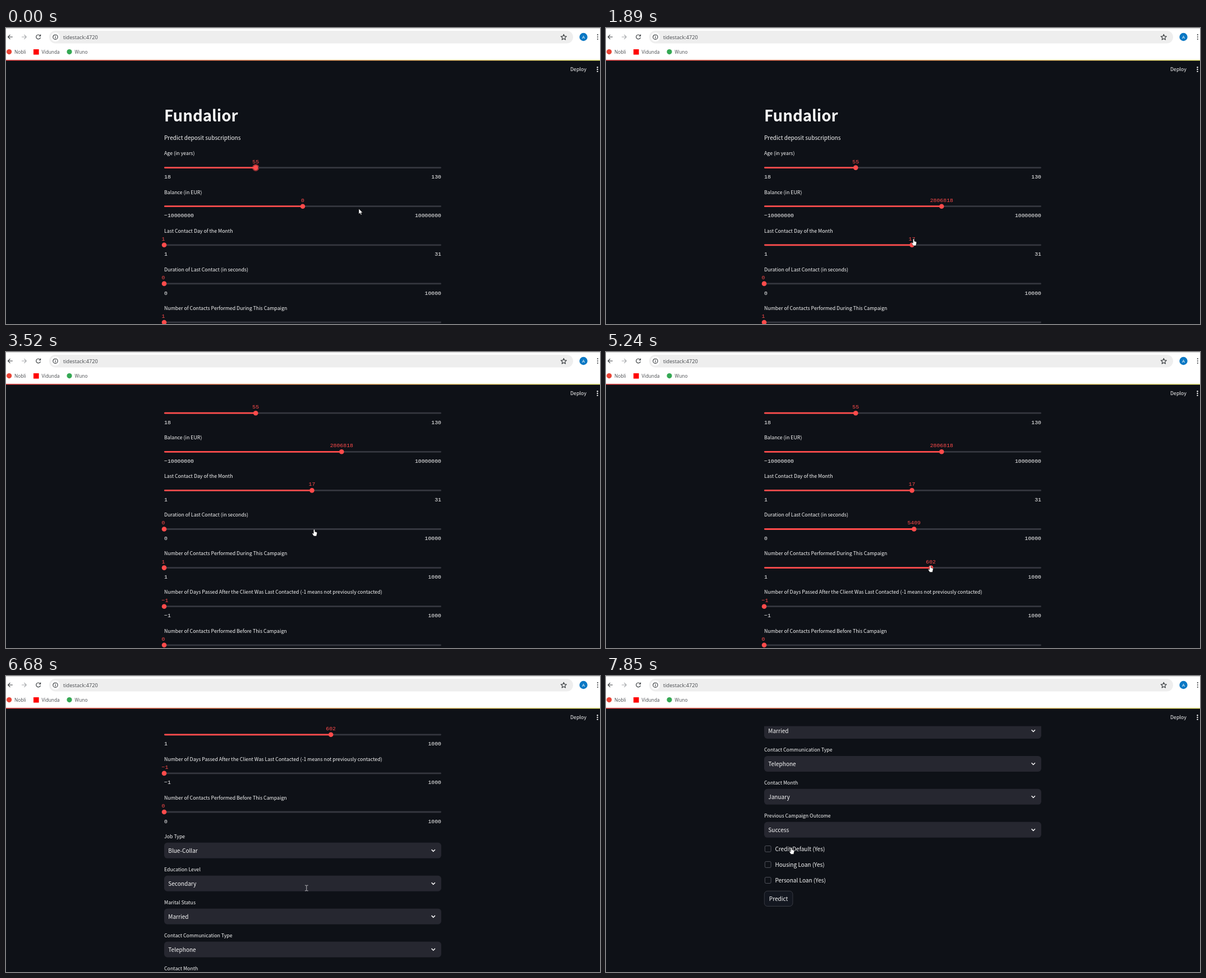
An HTML page for the animation above (8000 ms loop, 1059 px wide and 529 px high).

```html
<!DOCTYPE html>
<html lang="en">
<head>
<meta charset="utf-8">
<title>Deposit form</title>
<style>
html, body { margin: 0; width: 100%; height: 100%; overflow: hidden; background: #0e1117; }
svg { display: block; }
text { fill: #fafafa; font-family: "Noto Sans CJK JP", "Noto Sans CJK SC", "Open Sans", sans-serif; white-space: pre; }
.title { font-size: 27.66px; font-weight: 700; }
.body { font-size: 10.05px; }
.label { font-size: 8.79px; }
.mono { font-family: "Liberation Mono", "Noto Sans Mono", monospace; font-size: 9.8px; }
.value { fill: #ff4b4b; }
.end { text-anchor: end; }
.mid { text-anchor: middle; }
.url { font: 9.2px "Open Sans", "Noto Sans", sans-serif; fill: #45484c; }
.mark { font: 8.3px "Open Sans", "Noto Sans", sans-serif; fill: #45484c; }
.ava { font: 8px "Open Sans", sans-serif; fill: #fff; }
.ico { fill: none; stroke: #3c4043; stroke-width: 1.2; }
</style>
</head>
<body>
<svg width="1059" height="529" viewBox="0 0 1059 529">
  <defs>
    <linearGradient id="deco">
      <stop offset="0" stop-color="#ff4b4b"/>
      <stop offset="1" stop-color="#fffd80"/>
    </linearGradient>
  </defs>
  <rect width="1059" height="529" fill="#0e1117"/>
  <g id="page"></g>

  <rect width="1059" height="89.6" fill="#0e1117"/>
  <text class="label" x="1006" y="77">Deploy</text>
  <g fill="#fafafa"><circle cx="1054.5" cy="70.2" r="1.2"/><circle cx="1054.5" cy="73.9" r="1.2"/><circle cx="1054.5" cy="77.6" r="1.2"/></g>

  <rect width="1059" height="57" fill="#fff"/>
  <rect width="1059" height="1" fill="#cfcfcf"/>
  <rect y="56.8" width="1059" height="1.5" fill="url(#deco)"/>
  <rect x="77" y="5" width="934" height="22.5" rx="11.2" fill="#eeeeee"/>
  <path class="ico" d="M11.8 16H3.6M7.4 12.2L3.6 16l3.8 3.8"/>
  <path class="ico" style="stroke:#a5a8ab" d="M28 16h8.2M32.4 12.2l3.8 3.8-3.8 3.8"/>
  <path class="ico" d="M60.8 13.6A3.9 3.9 0 1 0 61.4 17M61.6 11.6v2.9h-2.9"/>
  <circle cx="88" cy="16.2" r="8.2" fill="#fff"/>
  <circle class="ico" cx="88" cy="16.2" r="4.2"/>
  <path class="ico" d="M88 15.6v3M88 13.6v1.1"/>
  <text class="url" x="102" y="19.7">tidestack:4720</text>
  <path class="ico" stroke-linejoin="round" d="M994.3 11.4l1.4 3.3 3.6.3-2.7 2.4.8 3.5-3.1-1.9-3.1 1.9.8-3.5-2.7-2.4 3.6-.3z"/>
  <circle cx="1029.5" cy="16" r="7.2" fill="#0b78c4"/>
  <text class="ava mid" x="1029.5" y="18.9">A</text>
  <g fill="#3c4043"><circle cx="1054.8" cy="12.2" r="1.1"/><circle cx="1054.8" cy="16" r="1.1"/><circle cx="1054.8" cy="19.8" r="1.1"/></g>
  <circle cx="5.6" cy="42.6" r="4.6" fill="#ea4335"/>
  <text class="mark" x="15" y="45.6">Nobli</text>
  <rect x="49" y="38" width="9.6" height="9.6" fill="#f00"/>
  <text class="mark" x="63.6" y="45.6">Vidunda</text>
  <circle cx="113" cy="42.6" r="4.6" fill="#34a853"/>
  <text class="mark" x="122.6" y="45.6">Wuno</text>

  <g id="cursor">
    <path data-kind="arrow" d="M0 0V9.6L2.2 7.6 3.7 10.9 5.3 10.2 3.8 7H6.8Z" fill="#fff" stroke="#000" stroke-width=".5"/>
    <path data-kind="hand" d="M-1.2 .9Q0-.7 1.2 .9V4L4.5 4.9Q5.4 5.3 5.1 7L4 12H-.8L-3.7 7.6Q-3.6 6-1.2 7.4Z" fill="#fff" stroke="#000" stroke-width=".5"/>
    <path data-kind="beam" d="M-2.8-4.8H-.8L0-4.2 .8-4.8H2.8M0-4.2V4.2M-2.8 4.8H-.8L0 4.2 .8 4.8H2.8" fill="none" stroke="#c9c9cc" stroke-width=".9"/>
  </g>
</svg>
<script>
const LOOP = 8000, LEFT = 282, WIDTH = 494, RIGHT = LEFT + WIDTH;
const page = document.getElementById('page');
const cursor = document.getElementById('cursor');

// label, min, max, first value, later value, time of the change
const sliders = [
  ['Age (in years)', 18, 130, 55],
  ['Balance (in EUR)', -10000000, 10000000, 0, 2806818, 930],
  ['Last Contact Day of the Month', 1, 31, 1, 17, 1760],
  ['Duration of Last Contact (in seconds)', 0, 10000, 0, 5409, 4600],
  ['Number of Contacts Performed During This Campaign', 1, 1000, 1, 602, 5240],
  ['Number of Days Passed After the Client Was Last Contacted (-1 means not previously contacted)', -1, 1000, -1],
  ['Number of Contacts Performed Before This Campaign', 0, 1000, 0]
];
const selects = [
  ['Job Type', 'Blue-Collar'], ['Education Level', 'Secondary'], ['Marital Status', 'Married'],
  ['Contact Communication Type', 'Telephone'], ['Contact Month', 'January'],
  ['Previous Campaign Outcome', 'Success']
];
const checks = ['Credit Default (Yes)', 'Housing Loan (Yes)', 'Personal Loan (Yes)'];

// runs of screen updates: first time, last time, count
const runs = [
  [0, 0, 1], [130, 380, 3], [530, 790, 3], [930, 930, 1], [1070, 1070, 1], [1220, 1220, 1],
  [1370, 1890, 5], [2050, 2560, 5], [2710, 3100, 4], [3390, 3520, 2], [4460, 4460, 1],
  [4600, 5370, 7], [5510, 6150, 6], [6290, 6680, 4], [6950, 7720, 7], [7850, 7850, 1]
];
const ticks = runs.flatMap(([a, b, n]) =>
  Array.from({ length: n }, (_, i) => n > 1 ? a + (b - a) * i / (n - 1) : a));

const scrollKeys = [
  [0, 0], [1960, 0], [2430, 140.4], [5400, 140.4], [5850, 351],
  [6200, 351], [6600, 421.2], [6860, 421.2], [7207, 635.5], [7440, 753], [8000, 753]
];
const cursorKeys = [
  [0, 629, 323, 'arrow'], [380, 603, 325, 'arrow'], [530, 601, 324, 'hand'], [790, 598, 321, 'hand'],
  [930, 598, 319, 'hand'], [1300, 598, 319, 'hand'], [1400, 592, 330, 'arrow'], [1700, 550, 376, 'hand'],
  [1890, 548.5, 377, 'hand'], [2050, 549, 375, 'arrow'], [2560, 549, 337, 'arrow'],
  [2960, 550, 320, 'hand'], [3100, 550, 318, 'hand'], [3520, 549.5, 317, 'hand'],
  [4460, 549, 314, 'hand'], [4728, 550, 315, 'hand'], [4800, 552, 322, 'arrow'], [5100, 577, 380, 'hand'],
  [5370, 579, 383, 'hand'], [5500, 572, 384, 'arrow'], [5760, 546, 385, 'beam'], [5894, 543.7, 385, 'beam'],
  [6680, 535.8, 379, 'beam'], [6950, 532, 376, 'arrow'], [7207, 515, 367, 'arrow'],
  [7400, 490, 362, 'arrow'], [7700, 332, 307, 'hand'], [7850, 330.5, 306.5, 'hand'], [8000, 330.5, 306.5, 'hand']
];

const text = (cls, x, y, s) => `<text class="${cls}" x="${x}" y="${y}">${s}</text>`;
const minus = n => String(n).replace('-', '−');

function sliderHtml([label, min, max], i) {
  const y = 249.6 + 69.1 * i;
  return text('label', LEFT, y - 22.2, label) +
    `<rect x="${LEFT}" y="${y - 1.4}" width="${WIDTH}" height="2.8" rx="1.4" fill="#35373f"/>
     <rect class="fill" x="${LEFT}" y="${y - 1.4}" height="2.8" rx="1.4" fill="#ff4b4b"/>
     <circle class="thumb" cy="${y}" r="4.3" fill="#ff4b4b"/>` +
    text('mono value', 0, y - 8, '') +
    text('mono', LEFT, y + 19.6, minus(min)) +
    text('mono end', RIGHT, y + 19.6, max);
}

function selectHtml([label, value], i) {
  const y = 733 + 58.96 * i;
  return text('label', LEFT, y - 22.1, label) +
    `<rect x="${LEFT}" y="${y - 14}" width="${WIDTH}" height="28" rx="5.6" fill="#262730"/>` +
    text('body', 289.3, y + 3.9, value) +
    `<path d="M758.6 ${y - 1.6}l3.2 3.2 3.2-3.2" fill="none" stroke="#fafafa" stroke-width="1.5"/>`;
}

function checkHtml(label, i) {
  const y = 1061.8 + 28.1 * i;
  return `<rect x="283.3" y="${y - 5.3}" width="10.8" height="10.8" rx="2" fill="#0e1117" stroke="#5b5d66" stroke-width=".9"/>` +
    text('body', 301.4, y + 3.9, label);
}

page.innerHTML =
  text('title', LEFT, 167.2, 'Fundalior') +
  text('body', LEFT, 199.5, 'Predict deposit subscriptions') +
  '<circle id="ring" cx="445.2" cy="249.6" r="6.3" fill="#ff4b4b" opacity=".55"/>' +
  sliders.map((s, i) => `<g class="slider">${sliderHtml(s, i)}</g>`).join('') +
  selects.map(selectHtml).join('') +
  checks.map(checkHtml).join('') +
  `<rect x="282.3" y="1137.3" width="50.6" height="27.2" rx="5.6" fill="#131720" stroke="#42454d" stroke-width=".8"/>` +
  text('body', 290.8, 1154.8, 'Predict');

const ring = document.getElementById('ring');
const parts = [...page.querySelectorAll('.slider')].map(g => ({
  fill: g.querySelector('.fill'), thumb: g.querySelector('.thumb'), value: g.querySelector('.value')
}));

function setSlider(i, t) {
  const [, min, max, before, after, at] = sliders[i];
  const v = at !== undefined && t >= at ? after : before;
  const x = LEFT + WIDTH * (v - min) / (max - min);
  const { fill, thumb, value } = parts[i];
  const s = minus(v);
  fill.setAttribute('width', x - LEFT);
  thumb.setAttribute('cx', x);
  value.textContent = s;
  value.setAttribute('x', v === min ? 277.6 : x - s.length * 2.94);
}

// linear interpolation of the numeric columns; other columns hold
function sample(keys, t) {
  let i = keys.length - 2;
  while (i > 0 && keys[i][0] > t) i--;
  const a = keys[i], b = keys[i + 1];
  const k = Math.min(1, (t - a[0]) / (b[0] - a[0]));
  return a.slice(1).map((v, j) => typeof v === 'number' ? v + (b[j + 1] - v) * k : v);
}

function draw(time) {
  const t = ticks.filter(v => v <= time + 1).pop();
  const [scroll] = sample(scrollKeys, t);
  const [x, y, kind] = sample(cursorKeys, t);
  page.setAttribute('transform', `translate(0 ${-scroll})`);
  parts.forEach((_, i) => setSlider(i, t));
  ring.style.display = t < 130 ? '' : 'none';
  cursor.setAttribute('transform', `translate(${x} ${y})`);
  for (const el of cursor.children) el.style.display = el.dataset.kind === kind ? '' : 'none';
}

const start = performance.now();
function frame() {
  draw((performance.now() - start) % LOOP);
  requestAnimationFrame(frame);
}
frame();
</script>
</body>
</html>
```
